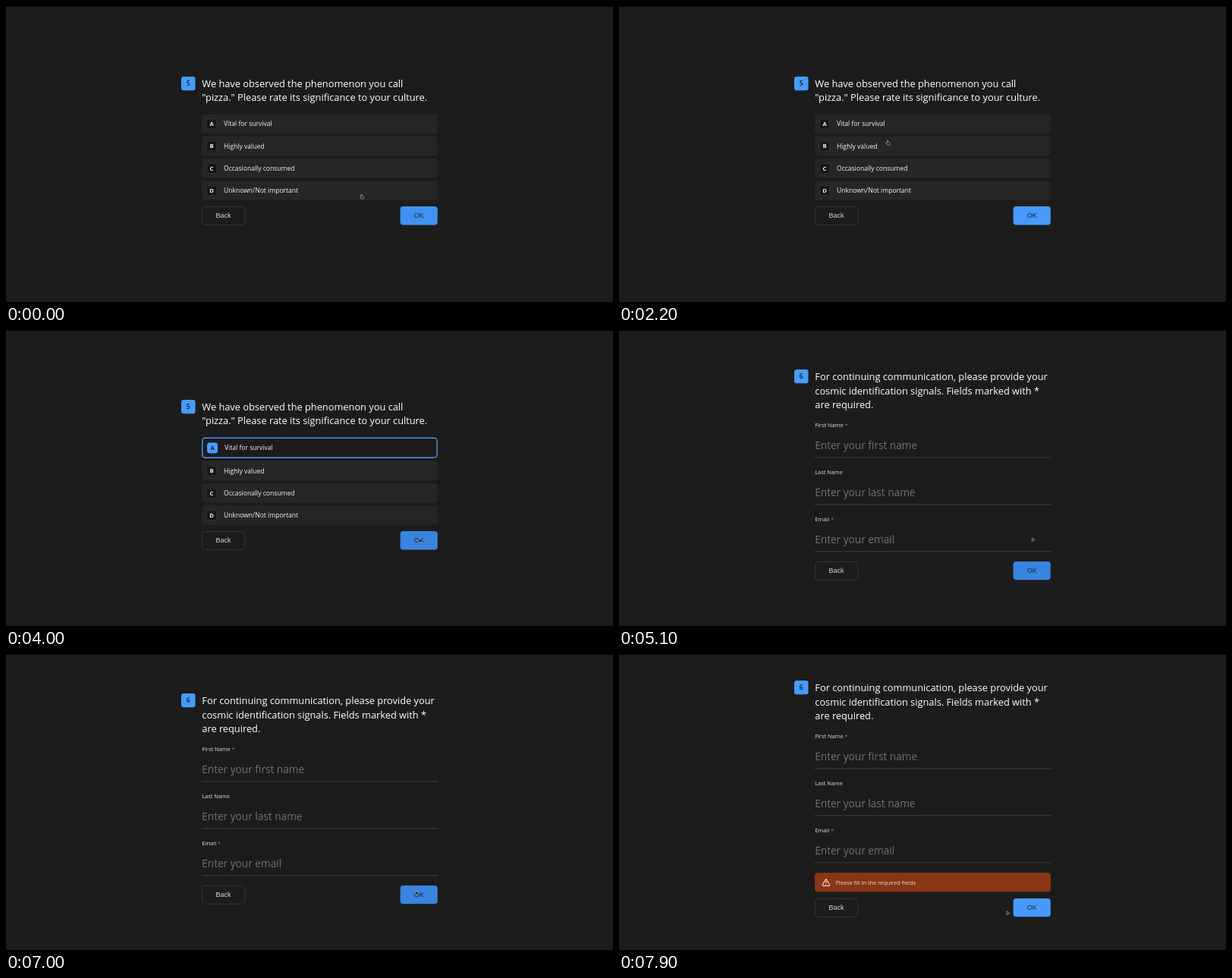
An HTML page for the animation above (8000 ms loop, 800x390 px).

```html
<!DOCTYPE html>
<html lang="en">
<head>
<meta charset="utf-8">
<title>Survey form</title>
<style>
  html, body { margin: 0; width: 100%; height: 100%; overflow: hidden; background: #1c1c1c; }
  svg { display: block; width: 100%; height: 100%; }
  text { font-family: "Open Sans", "Noto Sans", sans-serif; fill: #f4f4f4; }
  .head { font-size: 12.8px; fill: #fff; }
  .num { font-size: 8.6px; font-weight: 600; fill: #111a28; text-anchor: middle; }
  .opt { font-size: 8.55px; }
  .key { font-size: 7.6px; font-weight: 700; text-anchor: middle; }
  .label { font-size: 7.4px; fill: #dedede; }
  .hint { font-size: 13.65px; fill: #717171; }
  .btn { font-family: "Liberation Sans", Arial, sans-serif; font-size: 9px; text-anchor: middle; fill: #d8d8d8; }
  .ok { fill: #13243c; }
</style>
</head>
<body>
<svg id="stage" viewBox="0 0 800 390"></svg>
<script>
const LOOP = 8000, STEP = 100;
const BLUE = [71, 155, 252], BLUE_DARK = [57, 132, 222];
const PANEL = [38, 38, 38], PAGE = [28, 28, 28], KEY = [23, 23, 23];
const WHITE = [244, 244, 244], INK = [17, 26, 40];
const stage = document.getElementById('stage');

function el(parent, tag, attrs, text) {
  const node = document.createElementNS('http://www.w3.org/2000/svg', tag);
  set(node, attrs);
  if (text) node.textContent = text;
  return parent.appendChild(node);
}
function set(node, attrs) {
  for (const name in attrs) node.setAttribute(name, attrs[name]);
}
const group = parent => el(parent, 'g', {});
const box = (parent, x, y, width, height, rx, fill, stroke = 'none') =>
  el(parent, 'rect', { x, y, width, height, rx, fill, stroke });
const label = (parent, cls, x, y, text) => el(parent, 'text', { class: cls, x, y }, text);
const shift = (node, x, y) => node.setAttribute('transform', `translate(${x} ${y})`);
const show = (node, on) => node.setAttribute('display', on ? 'inline' : 'none');
const mix = (a, b, k) => a + (b - a) * k;
const blend = (a, b, k) => `rgb(${a.map((v, i) => Math.round(mix(v, b[i], k)))})`;
const ramp = (t, from, to) => Math.min(1, Math.max(0, (t - from) / (to - from)));
const ease = k => k * k * (3 - 2 * k);

function heading(parent, number, lines) {
  const g = group(parent);
  box(g, 231, 0, 18.5, 18.3, 3, blend(BLUE, BLUE, 0));
  label(g, 'num', 240.2, 12.3, number);
  lines.forEach((line, i) => label(g, 'head', 258.3, 14.4 + 18.1 * i, line));
  return g;
}
function buttons(parent) {
  const g = group(parent);
  box(g, 258.5, .5, 56.3, 24, 4, 'none', '#353535');
  label(g, 'btn', 286.5, 15.3, 'Back');
  const ok = box(g, 519.6, 0, 49.2, 24.4, 4, 'none');
  label(g, 'btn ok', 544.2, 15.1, 'OK');
  return { g, ok };
}

el(stage, 'rect', { width: 800, height: 390, fill: '#1c1c1c' });
el(stage, 'rect', { width: 800, height: 1, fill: '#000' });

// Choice page
const choice = group(stage);
const choiceHead = heading(choice, '5', [
  'We have observed the phenomenon you call',
  '"pizza." Please rate its significance to your culture.'
]);
const options = ['Vital for survival', 'Highly valued', 'Occasionally consumed', 'Unknown/Not important']
  .map((text, i) => {
    const g = group(choice);
    const panel = box(g, 258, 0, 310.8, 25.4, 4, '#262626');
    const inner = group(g);
    const key = box(inner, 264.5, 6.3, 13, 13, 2, blend(KEY, KEY, 0), '#303030');
    const letter = label(inner, 'key', 271, 15.6, 'ABCD'[i]);
    label(inner, 'opt', 287, 15.8, text);
    return { g, panel, inner, key, letter };
  });
const choiceButtons = buttons(choice);

// Contact page
const contact = group(stage);
const contactHead = heading(contact, '6', [
  'For continuing communication, please provide your',
  'cosmic identification signals. Fields marked with *',
  'are required.'
]);
const fields = group(contact);
const rules = [['First Name', 'first name', true], ['Last Name', 'last name'], ['Email', 'email', true]]
  .map(([name, hint, required], i) => {
    const y = 62 * i;
    const title = label(fields, 'label', 258.2, 128.2 + y, name + (required ? ' ' : ''));
    if (required) el(title, 'tspan', { fill: '#4b86dc' }, '*');
    label(fields, 'hint', 258.2, 157.1 + y, 'Enter your ' + hint);
    return box(fields, 258, 167.4 + y, 311, 1, 0, '#3c3f4b');
  });
const alertBar = group(contact);
box(alertBar, 258, 288.2, 311, 25, 4, '#893614');
el(alertBar, 'path', {
  d: 'M272.8 296.2L277.5 304.2Q277.9 305.3 276.8 305.4H268.8Q267.6 305.3 268.1 304.2ZM272.8 299.2V302M272.8 303.3V304.1',
  fill: 'none', stroke: '#fff', 'stroke-width': 1, 'stroke-linejoin': 'round'
});
label(alertBar, 'label', 285.4, 303.6, 'Please fill in the required fields');
const contactButtons = buttons(contact);

// Pointer, centred on its position
const pointer = group(stage);
const ink = { fill: '#1b1b1b', stroke: '#b4b4b4', 'stroke-width': .7, 'stroke-linejoin': 'round' };
const hand = el(pointer, 'path', {
  d: 'M-1.2 .6V-2.6Q-.6 -3.5 0 -2.6V-.6L1.8 -.2Q2.6 0 2.5 .9L2 3H-.8L-2.5 .8Q-2.3 -.1 -1.2 .6Z', ...ink
});
const arrow = el(pointer, 'path', { d: 'M-1.6 -2.7L2 .2L-.1 .8L-1.6 2.4Z', ...ink });

// time, x, y
const path = [
  [0, 469, 251], [200, 468, 195], [400, 440, 106], [600, 404, 150], [800, 378, 215],
  [1100, 330, 275], [1300, 276, 245], [1600, 302, 243], [1800, 358, 198], [2200, 354.5, 180],
  [2600, 352.5, 163], [3200, 352.5, 163], [3900, 546, 276.5], [5100, 546, 276.5],
  [5700, 454.8, 298.5], [6700, 454.8, 298.5], [7050, 546.3, 314.8], [7300, 546.3, 314.8],
  [7800, 512.8, 341.5], [8000, 512.8, 341.5]
];
function position(t) {
  const i = path.findIndex(p => p[0] > t);
  const [t0, x0, y0] = path[i - 1], [t1, x1, y1] = path[i];
  const k = ease(ramp(t, t0, t1));
  return [mix(x0, x1, k), mix(y0, y1, k)];
}

function draw(t) {
  const second = t >= 5100, failed = t >= 7100;
  show(choice, !second);
  show(contact, second);

  const k = ease(ramp(t, 2600, 2900));
  shift(choiceHead, 0, 92.9 - k);
  options.forEach((o, i) => shift(o.g, 0, 142.6 + 29.25 * i + (i ? k : -k)));
  const first = options[0];
  set(first.panel, {
    x: 258 + .7 * k, y: .7 * k, width: 310.8 - 1.4 * k, height: 25.4 + .6 * k,
    fill: blend(PANEL, PAGE, k), stroke: blend(PANEL, BLUE, k), 'stroke-width': 1.4 * k
  });
  shift(first.inner, k, k);
  set(first.key, { fill: blend(KEY, BLUE, k), stroke: blend([48, 48, 48], BLUE, k) });
  first.letter.style.fill = blend(WHITE, INK, k);
  shift(choiceButtons.g, 0, 264 + k);
  const hover = .4 * (1 - ramp(t, 0, 150)) + ramp(t, 3700, 3900);
  choiceButtons.ok.setAttribute('fill', blend(BLUE, BLUE_DARK, hover));

  const lift = failed ? 17 : 0;
  shift(contactHead, 0, 52 - lift);
  shift(fields, 0, -lift);
  rules.forEach(r => r.setAttribute('fill', failed ? '#2f4160' : '#3c3f4b'));
  show(alertBar, failed);
  shift(contactButtons.g, 0, 304.9 + lift);
  const hover2 = (1 - ramp(t, 5100, 5350)) + ramp(t, 6850, 7000) - ramp(t, 7100, 7300);
  contactButtons.ok.setAttribute('fill', blend(BLUE, BLUE_DARK, hover2));

  const [x, y] = position(t);
  const onOption = y > 142 && y < 257 && x > 258 && x < 569;
  const onOk = x > 520 && x < 569 && (second ? y > 305 + lift && y < 329 + lift : y > 264 && y < 290);
  const useHand = onOk || (!second && onOption);
  show(hand, useHand);
  show(arrow, !useHand);
  shift(pointer, x, y);
}

const start = performance.now();
function tick() {
  const t = (performance.now() - start) % LOOP;
  draw(Math.floor(t / STEP) * STEP);
  requestAnimationFrame(tick);
}
draw(0);
requestAnimationFrame(tick);
</script>
</body>
</html>
```
